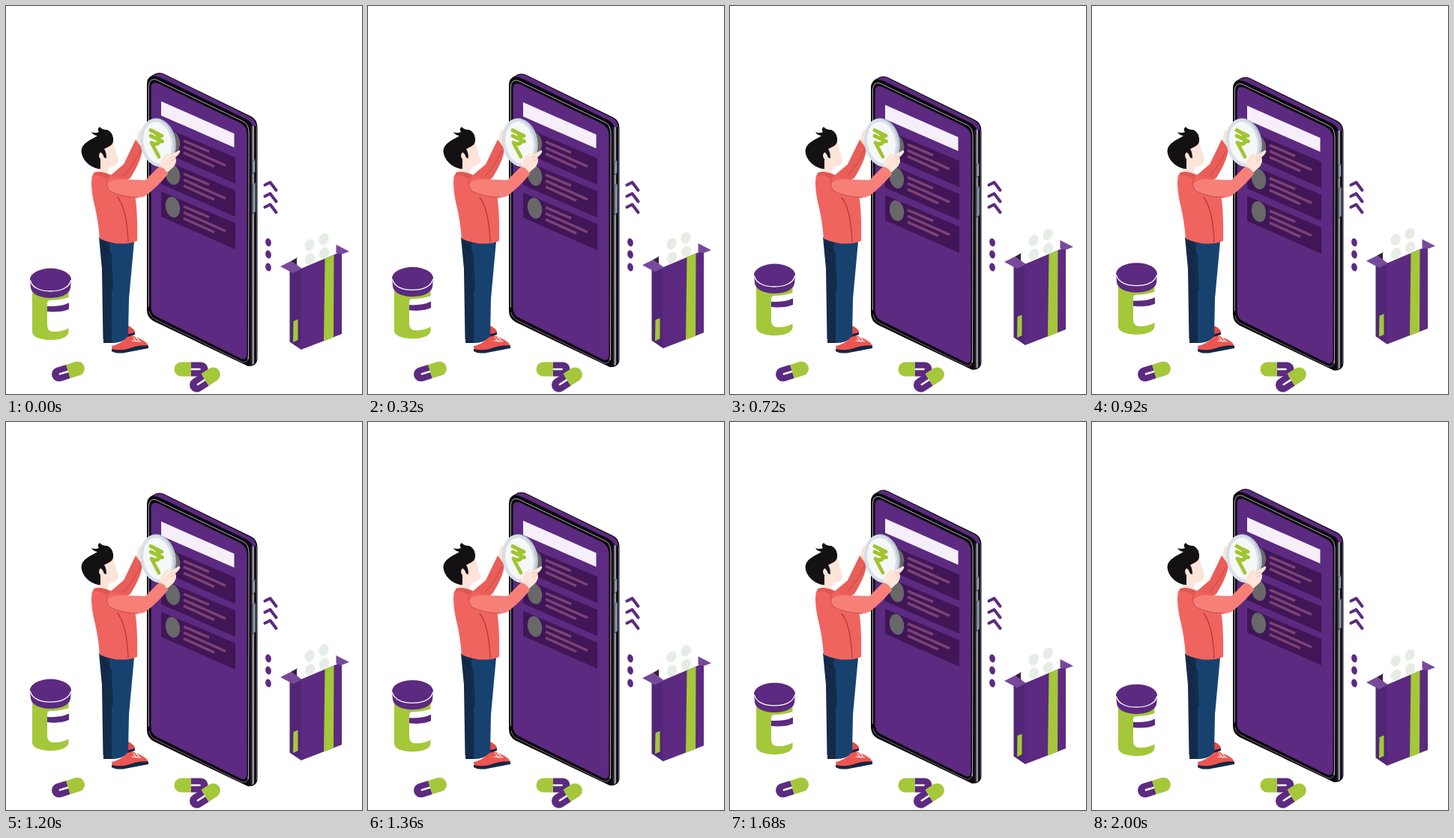
Write an HTML page that moves like this. It is 475 px wide and 517 px high and loops after 2040 ms.

```html
<!DOCTYPE html>
<html lang="en">
<head>
<meta charset="utf-8">
<title>Medicine app</title>
<style>
html, body { margin: 0; width: 100%; height: 100%; overflow: hidden; background: #fff; }
svg { display: block; }
.purple { fill: #5c2a80; }
.green { fill: #a4c839; }
.skin { fill: #fde4d8; }
.line { fill: none; stroke-linecap: round; stroke-linejoin: round; }
</style>
</head>
<body>
<svg width="475" height="517" viewBox="0 0 475 517">
  <defs>
    <linearGradient id="edge" x1="0" x2="1" y1="0" y2="0">
      <stop offset="0" stop-color="#0b090d"/>
      <stop offset=".3" stop-color="#15121a"/>
      <stop offset=".45" stop-color="#77747e"/>
      <stop offset=".56" stop-color="#c6c5ce"/>
      <stop offset=".66" stop-color="#1a171e"/>
      <stop offset=".86" stop-color="#0c0a10"/>
      <stop offset="1" stop-color="#6f7ba3"/>
    </linearGradient>
    <g id="capsule">
      <path class="purple" d="M0-9.5H-13A9.5 9.5 0 0 0-13 9.5H0Z"/>
      <path class="green" d="M0-9.5H13A9.5 9.5 0 0 1 13 9.5H0Z"/>
      <path class="line" d="M-11.500 0H-1" stroke="#fff" stroke-width="2.600"/>
    </g>
  </defs>

  <g id="phone">
    <path d="M188 104Q188 95 196 92Q202 87 210 90L327 147Q335 151 335.500 161V470Q335 480 323 480L197 420Q188 415 188 405Z" fill="#0b090d"/>
    <path class="purple" d="M196 93Q203 88 210 91L326 148Q334 152 334.500 164L330 163Q328 154 320 150.500L206 95.500Q201 93 196 93Z"/>
    <path d="M324 160H335V470Q334 478 324 479Z" fill="url(#edge)"/>
    <path class="line" d="M190.300 400V107Q191 96 200 98L316 153.500Q324 157 324 169L323.500 470" stroke="#aeacb6" stroke-width="1"/>
    <path class="line" d="M191 407Q192 414 200 418L313 473.500Q323 478 323 466" stroke="#8d8295" stroke-width=".8"/>
    <path class="purple" d="M193.500 110Q193 99.500 203 103L311 155Q321.500 160 321.500 171V463Q321.500 474 312 469L203 415Q193.500 411 193.500 401Z"/>
    <path d="M328.500 207L332.500 204V221L328.500 224ZM329 238L333 235V274L329 277Z" fill="#8f95a8" stroke="#30303a" stroke-width=".8"/>
    <path d="M207 127L304.500 170V188.500L207 146Z" fill="#f6eff9"/>
    <g id="cards"></g>
  </g>

  <g id="bottle">
    <path class="green" d="M35 378H83.500V434C83 442 71 445 59 445C46 445 35 441 35 434Z"/>
    <path d="M84 388Q72 392 60 392Q55 392 55 396V425Q55 434 64 434Q76 434 84 429Z" fill="#fff"/>
    <path class="purple" d="M55 400Q73 401 84 395.500V404Q73 409 55 407Z"/>
    <path class="purple" d="M32 364.500A27.500 15 0 0 1 87 364.500L86 376C84 385 72 389 59 389C46 389 34 384 33 375Z"/>
    <path class="line" d="M32.500 366C35 376 47 380 59 380C72 380 84 376 86.500 366" stroke="#fff" stroke-width="1.300"/>
  </g>

  <g id="box">
    <path d="M380 340L389 335V347L394 350Z" fill="#35213d"/>
    <path d="M388 336L440 313V332L395 349L388 345Z" fill="#fff"/>
    <g fill="#e6ede6" id="tablets"></g>
    <path d="M378.500 350L394 350V458L378.500 447.500Z" fill="#522677"/>
    <path class="purple" d="M393.500 350L448 327V437L393.500 458Z"/>
    <path class="green" d="M425.500 336.500L437.500 331.500L437 441.500L424 446.500ZM383.500 420L389.500 417.500V445L383 448Z"/>
    <path d="M366 347L380 340L395 350L383 356Z" fill="#77499c"/>
    <path d="M440.500 318L458 327L447.500 331L440.500 329Z" fill="#77499c"/>
  </g>

  <g class="line" id="arrows" stroke="#5c2a80" stroke-width="4"></g>
  <g class="purple" id="dots"></g>

  <use href="#capsule" transform="translate(83 487) rotate(-17)"/>
  <use href="#capsule" transform="translate(247 484) rotate(180)"/>
  <use href="#capsule" transform="translate(265.500 498) rotate(-33)"/>

  <g id="person">
    <path d="M130 437Q147 433 160 426Q165 426 168 429Q173 432 172 437L146 447L130 447Z" fill="#e04b47"/>
    <path d="M130 445V449H142L172 438V435Z" fill="#132847"/>
    <path d="M124 308L153 316L146 385L143 446Q136 448 129.500 444L128 350Z" fill="#132b49"/>
    <path d="M138 316L171 314L164 390L163 441Q153 450 141 449L141 378Z" fill="#17426f"/>
    <path class="line" d="M128 317Q133 328 140 330L142 378" stroke="#0b1d34" stroke-width="1"/>
    <path d="M141 453Q152 451 162 441Q169 438 176 442Q190 448 190 454L155 461L142 460Z" fill="#ee5550"/>
    <path d="M141 457Q154 460 165 456Q178 451 190 452.500V456L156 462.500Q145 463 141 460Z" fill="#132847"/>
    <path class="line" d="M170 442L174 447M173 441L177 445M168 446L180 447" stroke="#fff" stroke-width="1.200"/>

    <path class="skin" d="M174 184Q174 171 179 164L184 170L181 193L176 190Z"/>
    <path d="M138 227L157 211L173 178L182 190Q181 205 166 229L150 240Z" fill="#e95e59"/>
    <path class="line" d="M179 192Q171 211 157 226" stroke="#c4474a" stroke-width="1"/>

    <path class="skin" d="M124 190L143 181Q146 191 150 205Q150 210 144 213L137 215L135 225L121 222Z"/>
    <path d="M126 217C116 217 104 209 101 197C99 187 105 183 113 178Q119 175 122 173Q116 172 114 168Q119 170 124 168Q121 164 125 161Q128 165 135 165Q142 168 143 176Q144 184 138 187L131 190.500Q134 195 134 203L131 202Q129 196 126 195Q122 199 126 204Z" fill="#141115"/>

    <path d="M115 226Q120 219 132 223L151 229Q167 229 171 245Q176 270 175 313Q152 322 125 310Q123 285 118 265Q112 240 115 226Z" fill="#f0645f"/>
    <path d="M117 222Q126 219 140 225L135 232Q126 224 117 226Z" fill="#e25752"/>
    <path class="line" d="M149 255Q161 270 163 314" stroke="#b8383a" stroke-width="1.300"/>
    <path d="M134 238Q141 229 157 231L186 232L207 211Q214 216 216 224Q202 241 186 253Q174 259 145 250Q135 247 134 238Z" fill="#f67f78"/>
    <path class="line" d="M135 233Q133 241 139 247Q157 255 176 255" stroke="#c9494a" stroke-width="1"/>

    <g transform="rotate(-10 202 182)">
      <ellipse cx="203" cy="182" rx="23.500" ry="32.500" fill="#b9c5d1"/>
      <ellipse cx="201.500" cy="182" rx="22" ry="32" fill="#d6dfe7"/>
      <ellipse cx="202" cy="182" rx="18.500" ry="28" fill="#f5f7f8"/>
    </g>
    <path class="line" d="M193 165.500L208 173M193 173L208.500 180.500M199 168.500Q206 175 204.500 181Q201 186 194 182L204 201" stroke="#a0c52f" stroke-width="4.800"/>
    <path class="skin" d="M204 214Q207 203 214 197Q218 194 217 200L231 192Q234 193 230 198L226 202Q229 206 224 214L215 222Q211 215 204 214Z"/>
    <path class="line" d="M219 202L226 200M220 206L226 204" stroke="#edb9a8" stroke-width=".8"/>
  </g>
</svg>
<script>
const LOOP = 2040, STEP = 40;
const $ = id => document.getElementById(id);
const repeat = (id, items, draw) => { $(id).innerHTML = items.map(draw).join(''); };
const oval = (x, y, rx, ry, turn, extra = '') =>
  `<ellipse cx="${x}" cy="${y}" rx="${rx}" ry="${ry}" transform="rotate(${turn} ${x} ${y})" ${extra}/>`;

repeat('cards', [0, 44, 87.5], y => `<g transform="translate(0 ${y})">
  <path d="M207 159.700L306 201.700V236.700L207 193.200Z" fill="#401657"/>
  ${oval(222.5, 180.5, 9.5, 14, -12, 'fill="#686769"')}
  <path class="line" style="stroke-linecap:butt" d="M237 179.500L271 194M237 187.500L293 212.500M237 195.500L278 214" stroke="#7d4274" stroke-width="3.500"/>
</g>`);
repeat('tablets', [[424, 310.5], [405, 318.5], [424.5, 329], [405.5, 337]], ([x, y]) => oval(x, y, 6.3, 8, 28));
repeat('arrows', [0, 15, 29.5], y => `<path d="M345.500 ${238.5 + y}L352.500 ${235 + y}L360.500 ${245.5 + y}"/>`);
repeat('dots', [315, 331, 348], y => oval(350, y, 3.8, 5.5, -12));

const drift = { phone: 6, bottle: -7.5, box: -7.5 };

function frame() {
  const t = Math.floor(performance.now() % LOOP / STEP) * STEP;
  const lift = (1 - Math.cos(2 * Math.PI * t / LOOP)) / 2;
  for (const id in drift) $(id).setAttribute('transform', `translate(0 ${(drift[id] * lift).toFixed(2)})`);
  requestAnimationFrame(frame);
}
frame();
</script>
</body>
</html>
```
